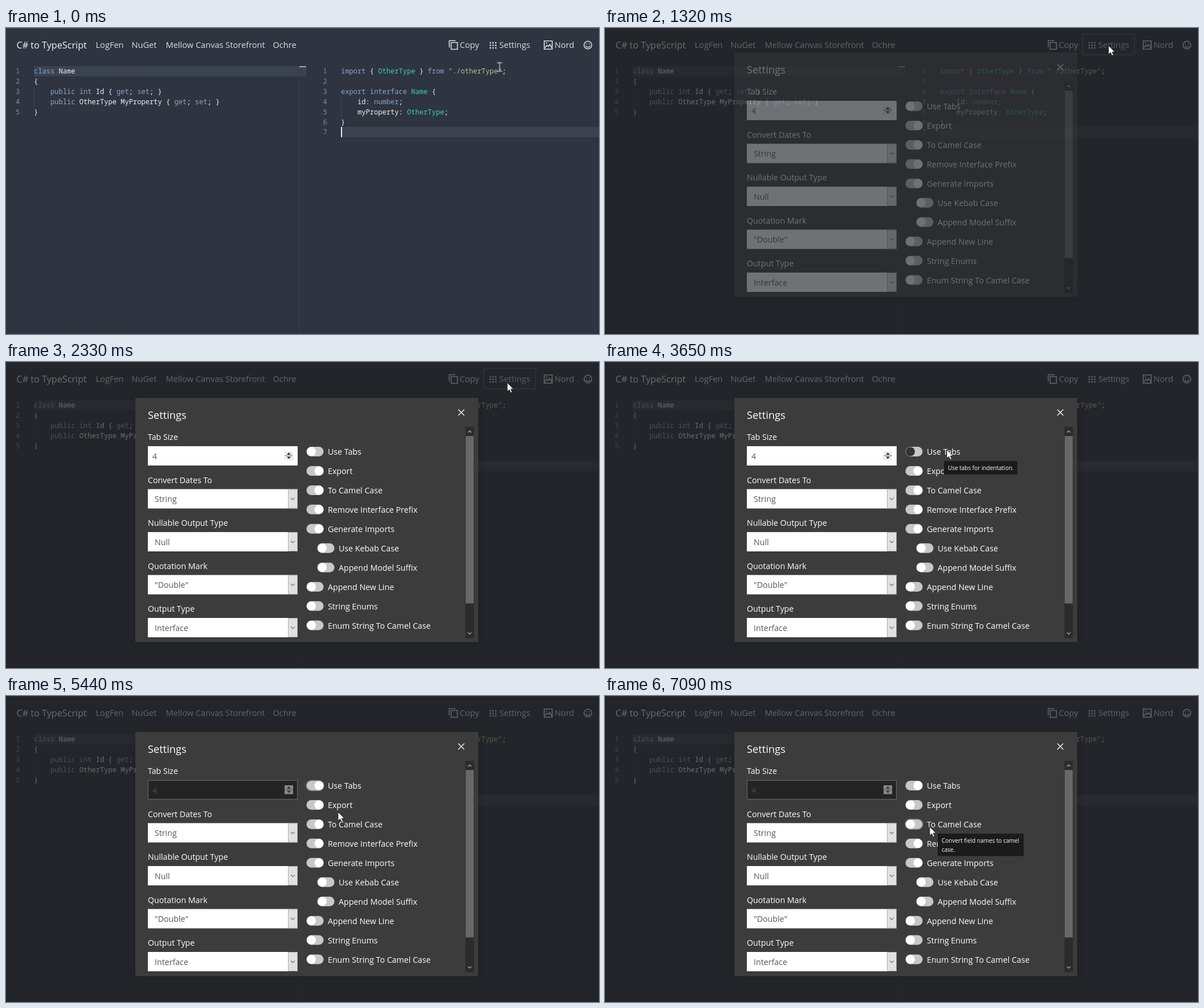
Write an HTML page that moves like this. It is 1041 px wide and 538 px high and loops after 8000 ms.

```html
<!DOCTYPE html>
<html lang="en">
<head>
<meta charset="utf-8">
<title>Settings dialog</title>
<style>
  html, body { margin: 0; width: 100%; height: 100%; overflow: hidden; background: #2e3440; }
  svg { display: block; width: 1041px; height: 538px; }
  text { font: 14.2px "Open Sans", "Noto Sans", sans-serif; fill: #fff; white-space: pre; }
  .nav text { font-size: 14.6px; fill: #dcdee1; }
  .nav .brand { font-size: 16.2px; fill: #f4f5f6; }
  .icon { fill: none; stroke: #dcdee1; stroke-width: 1.6; }
  .code { font: 12.08px "Noto Sans Mono", "DejaVu Sans Mono", monospace; fill: #f0f2f5; }
  .num { fill: #858990; }
  .kw { fill: #86a8ca; }
  .type { fill: #3dd0b6; }
  .str { fill: #b0c492; }
  .title { font-size: 18.3px; }
  .value { fill: #555; }
  .tip text { font-size: 10px; }
  .tip rect { fill: #1b1b1b; }
  .chev { fill: none; stroke: #666; stroke-width: 1.1; }
  .pill { fill: #c8c8c8; }
  .ring { fill: none; stroke: #777; stroke-width: 1.5; }
  .knob { fill: #fff; }
  #panel { fill: #3c3c3c; filter: drop-shadow(0 2px 6px rgba(0, 0, 0, .18)); }
  .live { animation: 8s step-end infinite; }
</style>
</head>
<body>
<svg viewBox="0 0 1041 538">
  <rect width="1041" height="538" fill="#2e3440"/>
  <rect width="1041" height="1" fill="#4a4f5a"/>

  <g class="nav">
    <text class="brand" x="18.5" y="35.5">C# to TypeScript</text>
    <text x="157.5" y="35">LogFen</text>
    <text x="220.5" y="35">NuGet</text>
    <text x="280.5" y="35">Mellow Canvas Storefront</text>
    <text x="468.5" y="35">Ochre</text>
    <text x="796.5" y="35">Copy</text>
    <text id="open" x="866" y="35">Settings</text>
    <text x="963" y="35">Nord</text>
  </g>
  <g class="icon">
    <path d="M781.5 25.5H792.5V37.5H781.5ZM778.2 34V22.2H789"/>
    <path d="M849 26h12M849 30.5h12M849 35h12" stroke-width="2.4" stroke-dasharray="2.4 2.4"/>
    <path d="M944.8 22.8H958.8V37.2H944.8Z"/>
    <path d="M946 34.800l3.800-4.600 2.400 2.400 2.400-3.600 3.600 5.800M947.600 26.400h2.400"/>
    <circle cx="1021.5" cy="30" r="6.8"/>
    <path d="M1017.8 31.5q3.7 5 7.4 0M1018.3 28h1.6M1023 28h1.6"/>
  </g>
  <rect id="focus" x="838.5" y="11" width="91" height="36" rx="2" fill="none" stroke="#555b67" stroke-width="1.5"/>

  <path d="M49 67h478v18H49ZM588 174h453v18H588Z" fill="#3b4252"/>
  <path d="M514.5 67V538" stroke="#3b404b"/>
  <path d="M515 68h12" stroke="#a3a6ab" stroke-width="2"/>
  <path d="M49.5 103V139M588.5 121V157" stroke="#414754"/>
  <g id="editors"></g>
  <rect id="caret" x="588" y="174" width="2" height="18" fill="#f0f0f0"/>

  <rect id="backdrop" width="1041" height="538" fill="rgba(30,30,30,.63)"/>
  <g id="modal">
    <rect id="panel" x="227" y="63" width="602" height="429.5"/>
    <text class="title" x="249" y="99.5">Settings</text>
    <path d="M794 83.5l10.5 10.5M804.5 83.5l-10.5 10.5" stroke="#fff" stroke-width="1.3"/>
    <g id="fields"></g>
    <g id="switches"></g>
    <rect x="806.5" y="114" width="15" height="371.5" fill="#2b2b2b"/>
    <rect x="807" y="130" width="14" height="294.5" fill="#686868"/>
    <path class="chev" d="M811 124l3-3 3 3M811 475.5l3 3 3-3" style="stroke:#a0a0a0;stroke-width:1.5"/>
  </g>

  <g id="tips"></g>
  <g id="pointer">
    <path id="beam" d="M-4.5-7.5h3.5l1 1 1-1H4.5M0-7V7M-4.5 7.5h3.5l1-1 1 1H4.5" fill="none" stroke="#c9c9c9" stroke-width="1.3"/>
    <path id="arrow" d="M0 0V15.2L3.6 12 6 17.4 8.5 16.3 6.1 11.1H10.8Z" fill="#fff" stroke="#1a1a1a" stroke-width=".8"/>
  </g>
</svg>

<script>
  const LOOP = 8000;
  const $ = id => document.getElementById(id);
  const sheet = document.head.appendChild(document.createElement('style')).sheet;

  // Hold each [ms, css] pose until the next one.
  function pose(id, steps) {
    const frames = steps.map(([ms, css]) => `${ms / LOOP * 100}% {${css}}`).join('');
    sheet.insertRule(`@keyframes ${id} {${frames}}`);
    $(id).classList.add('live');
    $(id).style.animationName = id;
  }
  const prop = (name, steps) => steps.map(([ms, v]) => [ms, `${name}:${v}`]);
  const fade = (id, ...steps) => pose(id, prop('opacity', steps));
  const slide = (id, ...steps) =>
    pose(id, steps.map(([ms, x]) => [ms, `transform:translateX(${x}px)`]));

  // Code editors
  const KEYWORDS = 'class|public|int|get|set|import|from|export|interface|number';
  function editor(x, numX, types, rows) {
    const token = new RegExp(`("[^"]*")|\\b(${KEYWORDS})\\b|\\b(${types})\\b`, 'g');
    return rows.map((row, i) => {
      const y = 80 + 17.9 * i;
      const html = row.replace(token, (all, str, kw) =>
        `<tspan class="${str ? 'str' : kw ? 'kw' : 'type'}">${all}</tspan>`);
      return `<text class="code num" x="${numX}" y="${y}">${i + 1}</text>
        <text class="code" x="${x}" y="${y}">${html}</text>`;
    }).join('');
  }
  $('editors').innerHTML =
    editor(49, 17, '-', [
      'class Name', '{',
      '    public int Id { get; set; }',
      '    public OtherType MyProperty { get; set; }', '}'
    ]) +
    editor(588, 556.5, 'OtherType|Name', [
      'import { OtherType } from "./otherType";', '',
      'export interface Name {',
      '    id: number;', '    myProperty: OtherType;', '}', ''
    ]);

  // Left column of the dialog
  const spinner = (back, ink) => `
    <path d="M489 157h15v15.5h-15Z" fill="${back}"/>
    <path d="M493 163l3.5-4 3.5 4ZM493 166.5l3.5 4 3.5-4Z" fill="${ink}"/>
    <path d="M489 164.7h15" stroke="${ink}" stroke-width=".6"/>`;
  const fields = [['Tab Size', '4'], ['Convert Dates To', 'String'],
    ['Nullable Output Type', 'Null'], ['Quotation Mark', '"Double"'], ['Output Type', 'Interface']];
  $('fields').innerHTML = fields.map(([label, value], i) => {
    const y = 75.5 * i;
    const button = i ? `
      <path d="M495.5 148.5h16v33h-16Z" fill="#e1e1e1" stroke="#adadad"/>
      <path class="chev" d="M500 163.5l3.3 3.3 3.3-3.3"/>` : spinner('#ececec', '#333');
    return `<g transform="translate(0 ${y})">
      <text x="249" y="137">${label}</text>
      <rect x="249" y="148" width="263" height="34" fill="#fff"/>
      <text class="value" x="${i ? 261 : 257}" y="170.5">${value}</text>${button}</g>`;
  }).join('') + `<g id="disabled">
      <rect x="249.5" y="148.5" width="262" height="33" fill="#242424" stroke="#6b6b6b"/>
      <text x="257" y="170.5" style="fill:#4c4c4c">4</text>${spinner('#888', '#333')}</g>`;

  // Right column: label, on, indent
  const switches = [['Use Tabs', 0], ['Export', 1], ['To Camel Case', 1],
    ['Remove Interface Prefix', 1], ['Generate Imports', 1], ['Use Kebab Case', 0, 19],
    ['Append Model Suffix', 0, 19], ['Append New Line', 0], ['String Enums', 0],
    ['Enum String To Camel Case', 0]];
  $('switches').innerHTML = switches.map(([label, on, indent = 0], i) => `
    <g transform="translate(${indent} ${33.95 * i})">
      <rect class="pill" x="527.5" y="149" width="30" height="17" rx="8.5"/>
      ${i < 3 ? `<rect class="ring" id="ring${i}" x="527" y="148.5" width="31" height="18" rx="9"/>` : ''}
      <g id="slot${i}" transform="translate(${on * 13.5} 0)">
        <circle class="knob" id="knob${i}" cx="536" cy="157.5" r="8"/>
      </g>
      <text x="565" y="163">${label}</text>
    </g>`).join('');

  // Tooltips
  const tip = (id, x, y, w, ...lines) => `<g class="tip" id="${id}">
    <rect x="${x}" y="${y}" width="${w}" height="${8 + 15.7 * lines.length}"/>
    ${lines.map((line, i) => `<text x="${x + 7}" y="${y + 16 + 16 * i}">${line}</text>`).join('')}</g>`;
  $('tips').innerHTML =
    tip('tipTabs', 595, 174, 129, 'Use tabs for indentation.') +
    tip('tipExport', 574, 223, 170, 'Add export keyword to types.') +
    tip('tipCamel', 584, 242, 151, 'Convert field names to camel', 'case.');

  // Pointer: eased moves along quadratic curves, in n held steps
  const at = (x, y) => `transform:translate(${x}px,${y}px)`;
  function move(t0, t1, n, a, b, c = [(a[0] + b[0]) / 2, (a[1] + b[1]) / 2]) {
    return Array.from({ length: n }, (_, i) => {
      const k = i / (n - 1), u = k * k * (3 - 2 * k), v = 1 - u;
      const [x, y] = a.map((p, j) => v * v * p + 2 * u * v * c[j] + u * u * b[j]);
      return [t0 + (t1 - t0) * k, at(x, y)];
    });
  }
  pose('pointer', [
    [0, at(866.5, 68.5)],
    ...move(470, 790, 5, [868, 63], [884, 31]),
    ...move(2330, 3110, 11, [880, 36.5], [793, 83]),
    ...move(3190, 3650, 7, [782, 94], [600, 154], [660, 270]),
    ...move(4520, 5210, 10, [599, 156], [579, 203]),
    ...move(5440, 6240, 11, [583, 204], [582, 197], [598, 290]),
    ...move(6310, 6390, 2, [578, 216], [570, 230])
  ]);
  fade('beam', [0, 1], [550, 0]);
  fade('arrow', [0, 0], [550, 1]);

  // Page and dialog
  fade('caret', [0, 1], [470, 0], [940, 1], [1090, 0]);
  pose('open', prop('fill', [[0, '#dcdee1'], [710, '#c0c4ca'], [2410, '#dcdee1']]));
  fade('focus', [0, 0], [1090, 1], [2410, 0]);
  fade('backdrop', [0, 0], [1320, 1]);
  pose('modal', [[0, 0, -30], [1320, .35, -20], [1410, .63, -11], [1490, .9, -3], [1570, 1, 0]]
    .map(([ms, alpha, y]) => [ms, `opacity:${alpha};transform:translateY(${y}px)`]));

  // Switches and their effects
  pose('knob0', prop('fill', [[0, '#fff'], [3570, '#333'], [3820, '#fff']]));
  slide('slot0', [0, 0], [3820, 5], [3900, 10], [3980, 13.5]);
  slide('slot1', [0, 13.5], [6080, 9], [6160, 4], [6240, 0]);
  slide('slot2', [0, 13.5], [6780, 11], [6860, 7.5], [6940, 4], [7020, 1.5], [7090, 0]);
  fade('ring0', [0, 0], [3820, 1], [6000, 0]);
  fade('ring1', [0, 0], [6000, 1], [6700, 0]);
  fade('ring2', [0, 0], [6700, 1]);
  fade('disabled', [0, 0], [3820, .4], [3900, .8], [3980, 1]);
  fade('tipTabs', [0, 0], [3570, .5], [3650, 1], [4600, 0]);
  fade('tipExport', [0, 0], [5130, .5], [5210, 1], [5440, 0]);
  fade('tipCamel', [0, 0], [6310, .5], [6390, 1]);
</script>
</body>
</html>
```
